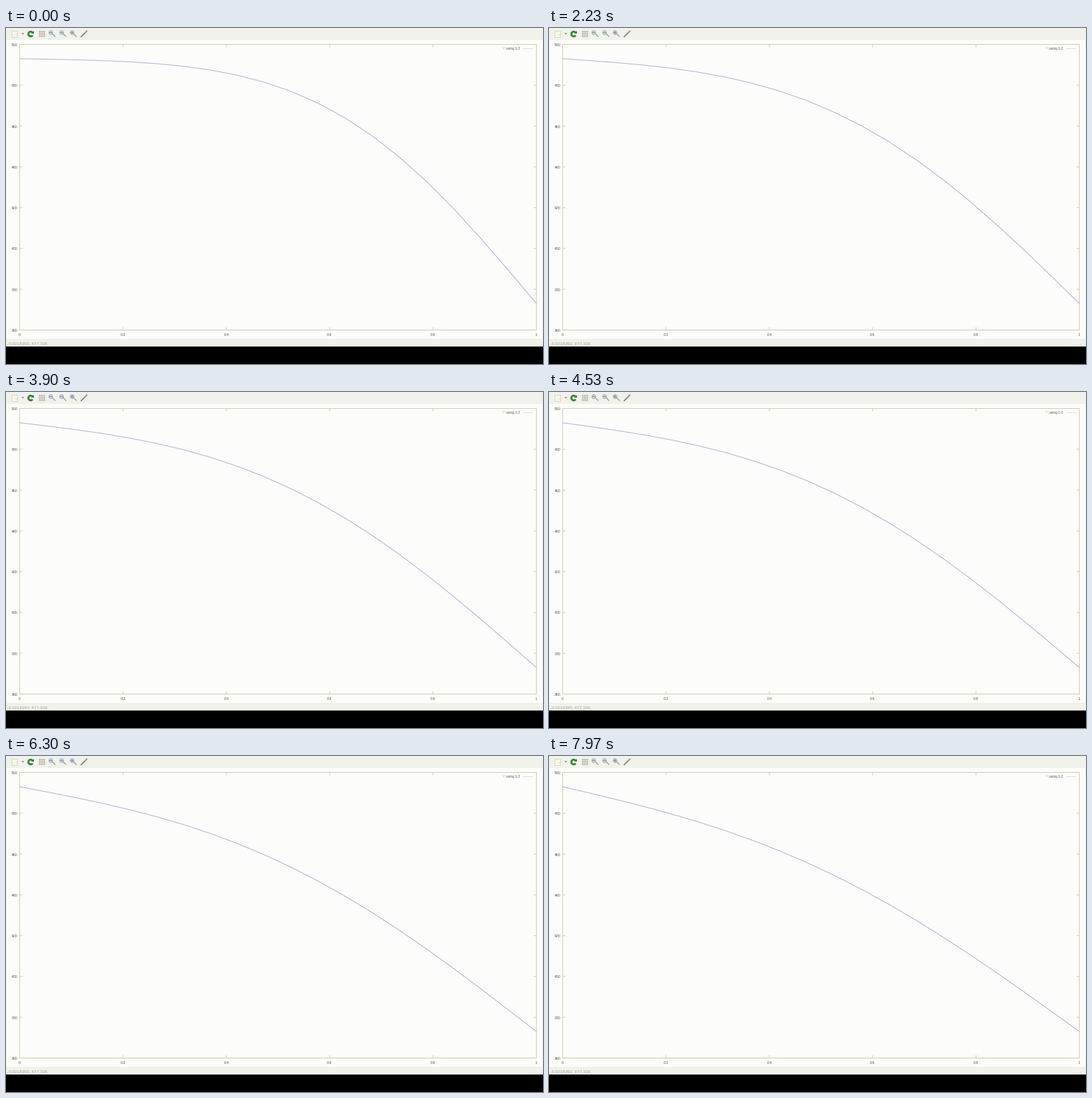
A matplotlib script for the animation above (8000 ms loop, 768 by 480 pixels).

```python
import numpy as np
import matplotlib.pyplot as plt
from matplotlib.animation import FuncAnimation
from matplotlib.patches import Circle, Polygon, Rectangle, Wedge

W, H, DPI = 768, 480, 100
LOOP, STEP = 8000, 32
LEFT, RIGHT, TOP, BOTTOM = 19.5, 758.5, 23.5, 431.5

PANEL = "#f2f2ec"
PAPER = "#fcfcfa"
BORDER = "#cfcfb4"
INK = "#5c5c50"
CURVE = "#b8b0dc"

plt.rcParams["font.family"] = "Liberation Sans"
fig = plt.figure(figsize=(W / DPI, H / DPI), dpi=DPI, facecolor="black")
ax = fig.add_axes([0, 0, 1, 1])
ax.set_xlim(0, W)
ax.set_ylim(H, 0)
ax.axis("off")


def px(n):
    return n * 72 / DPI


def rect(x, y, w, h, color):
    ax.add_patch(Rectangle((x, y), w, h, fc=color, ec="none", lw=0))


def line(xs, ys, color=BORDER, width=1.0, **kw):
    # Snapping would push half-pixel centres one pixel to the right.
    return ax.plot(xs, ys, color=color, lw=px(width), snap=False, **kw)[0]


def label(x, y, text, size=5.3, ha="center", color=INK):
    ax.text(x, y, text, fontsize=px(size), ha=ha, va="center_baseline", color=color)


def to_x(v):
    return LEFT + v * (RIGHT - LEFT)


def to_y(v):
    return BOTTOM - (v - 360) / 140 * (BOTTOM - TOP)


def magnifier(x, sign):
    line([x + 1, x + 4.5], [8.5, 12], "#a3a293", 1.4)
    ax.add_patch(Circle((x - 1.5, 6.5), 2.7, fc="#cbdae2", ec="#9fb0bb", lw=px(1)))
    line([x - 3, x], [6.5, 6.5], "#6f8cab", 1)
    if sign == "+":
        line([x - 1.5, x - 1.5], [5, 8], "#6f8cab", 1)


def toolbar():
    ax.add_patch(Rectangle((8, 4), 8, 9, fc="#f7f7ee", ec="#d9d8bd", lw=px(1)))
    line([14, 17], [10, 10], "#d9d8bd", 1)
    ax.add_patch(Polygon([(22, 7), (26, 7), (24, 9.5)], fc="#96947c", lw=0))
    ax.add_patch(Wedge((35.3, 8.6), 4.7, 35, 325, width=2.7, fc="#33862a", lw=0))
    ax.add_patch(Polygon([(35.5, 7.8), (40.3, 7.8), (40.3, 3.6)], fc="#33862a", lw=0))
    for k in (-3, 0, 3):
        line([51.5 + k] * 2, [4, 13], "#b4b4ac", 1)
        line([47, 56], [8.5 + k] * 2, "#b4b4ac", 1)
    for x, sign in ((65.5, "-"), (81, "-"), (96, "+")):
        magnifier(x, sign)
    line([107.5, 112], [12.5, 8], "#77766a", 1.5)
    line([112, 115.5], [8, 4.5], "#99988a", 2)


def scales():
    line([LEFT, RIGHT, RIGHT, LEFT, LEFT], [TOP, TOP, BOTTOM, BOTTOM, TOP])
    for v in range(360, 501, 20):
        y = to_y(v)
        line([LEFT, LEFT + 3.5], [y, y])
        line([RIGHT - 3.5, RIGHT], [y, y])
        label(17, y + 0.5, str(v), ha="right")
    for k in range(6):
        x = to_x(k / 5)
        line([x, x], [BOTTOM - 3.5, BOTTOM])
        line([x, x], [TOP, TOP + 3.5])
        label(x, 438, f"{k / 5:g}")


rect(0, 0, W, 455, PANEL)
rect(1, 17, W - 2, 427, PAPER)
toolbar()
scales()
label(735, 29.5, "'-' using 1:2", 4.9, "right")
line([740, 753], [29.5, 29.5], "#e2dcec")
label(4, 450, "0.0218390, 477.336", 6.2, "left", "#a5a594")

# Rod held at 493 and 373 at its ends, as a sine series.
xs = np.linspace(0, 1, 20)
modes = np.arange(1, 13)[:, None]
waves = 2 / (np.pi * modes) * (-1.0) ** modes * np.sin(np.pi * modes * xs)
curve = line([], [], CURVE, 1.0, solid_joinstyle="round")


def update(i):
    tau = 0.05 + 0.011 * i * STEP / 1000
    decay = np.exp(-((np.pi * modes) ** 2) * tau)
    heat = 493 - 120 * (xs + (waves * decay).sum(axis=0))
    curve.set_data(to_x(xs), to_y(heat))
    return [curve]


anim = FuncAnimation(fig, update, frames=LOOP // STEP, interval=STEP, repeat=True,
                     repeat_delay=0, init_func=lambda: update(0))
plt.show()
```
